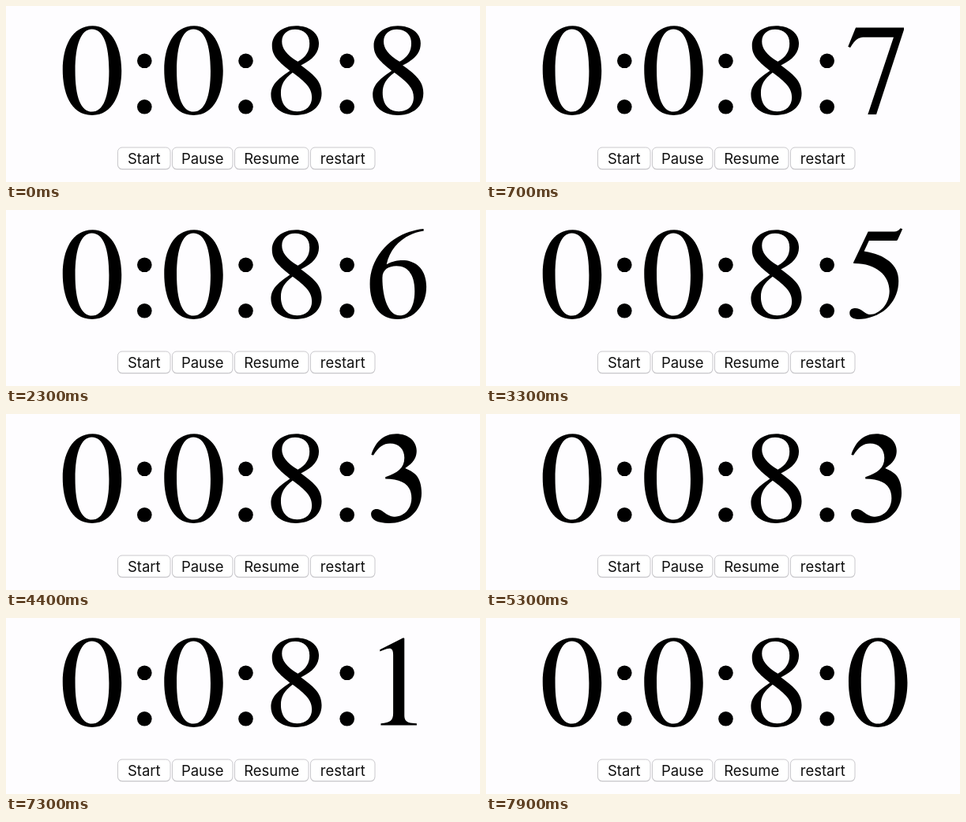
Recreate the animation shown at these times as an HTML page. Size 600 by 224 pixels, loop 8000 ms.

```html
<!DOCTYPE html>
<html lang="en">
<head>
<meta charset="utf-8">
<title>Countdown</title>
<style>
  html, body { margin: 0; width: 100%; height: 100%; overflow: hidden; background: #fefdff; }
  svg { display: block; width: 600px; height: 224px; }
  text { font: 18.5px Inter, Roboto, sans-serif; text-anchor: middle; fill: #111; }
</style>
</head>
<body>
<svg id="stage" viewBox="0 0 600 224" role="img" aria-label="Countdown timer">
  <g id="clock" fill="#000"></g>
  <g id="buttons"></g>
</svg>
<script>
// Digit outlines on a 1000-unit em, y pointing up
const DIGITS = [
  "M476 330C476 158 413 -14 250 -14C79 -14 24 172 24 336C24 513 93 676 254 676C385 676 476 535 476 330ZM380 325C380 533 336 650 248 650C165 650 120 532 120 329C120 126 164 12 250 12C335 12 380 127 380 325Z",
  "M394 0H118V15C192 19 213 40 213 95V544C213 578 204 593 183 593C173 593 156 588 138 581L111 571V585L290 676L299 673V76C299 33 319 15 394 15Z",
  "M474 137L420 0H29V12L207 201C301 300 337 376 337 461C337 552 283 602 198 602C126 602 91 570 51 472L30 477C51 594 115 676 238 676C351 676 423 599 423 500C423 421 384 346 295 252L130 76H364C406 76 427 87 460 143Z",
  "M61 510L45 514C74 609 137 676 237 676C328 676 393 621 393 544C393 492 369 452 305 410C347 392 372 376 388 358C415 327 431 280 431 219C431 154 407 96 367 56C322 10 256 -14 180 -14C94 -14 43 11 43 55C43 78 60 94 86 94C102 94 117 88 148 66C183 41 201 36 228 36C298 36 354 99 354 178C354 280 284 328 153 328V342C245 372 299 410 299 490C299 558 255 601 189 601C139 601 101 575 61 510Z",
  "M472 167H370V0H292V167H12V231L326 676H370V231H472ZM292 231V574L52 231Z",
  "M438 681L402 602C399 595 395 592 384 592H181L143 511C234 495 290 472 335 434C382 394 408 347 408 280C408 196 375 123 315 68C255 14 171 -14 97 -14C57 -14 32 4 32 32C32 58 48 70 76 70C97 70 114 63 138 44C156 29 172 22 187 22C263 22 338 104 338 204C338 324 235 417 72 417C64 417 61 419 61 424L64 430L174 662H375C395 662 407 669 423 688Z",
  "M446 684L448 668C293 643 192 543 162 409C212 434 248 440 285 440C398 440 468 359 468 238C468 166 448 109 409 63C371 14 313 -14 246 -14C180 -14 127 11 90 59C54 107 34 175 34 257C34 482 218 662 446 684ZM378 203C378 328 328 396 238 396C178 396 130 368 130 306C130 150 178 14 264 14C336 14 378 86 378 203Z",
  "M449 646L237 -8H172L370 588H153C98 588 78 575 37 507L20 515L79 662H449Z",
  "M445 155C445 51 366 -14 247 -14C137 -14 56 52 56 142C56 212 94 257 201 329C96 413 64 454 64 524C64 610 143 676 248 676C345 676 424 625 424 541C424 468 381 418 286 371C402 288 445 238 445 155ZM352 541C352 607 309 648 241 648C181 648 140 611 140 555C140 502 172 457 262 399C327 437 352 480 352 541ZM370 124C370 186 335 230 237 304L222 315C157 266 132 222 132 158C132 70 180 14 256 14C324 14 370 57 370 124Z"
];
const LOOP = 8000, TICK = 1000, FIRST_TICK = 400;
const EM = 164.8, BASELINE = 136.6;

function add(parent, tag, attrs, label) {
  const node = document.createElementNS("http://www.w3.org/2000/svg", tag);
  for (const key in attrs) node.setAttribute(key, attrs[key]);
  if (label) node.textContent = label;
  return parent.appendChild(node);
}

const stage = document.getElementById("stage");
const clock = document.getElementById("clock");
const buttons = document.getElementById("buttons");

const scale = EM / 1000;
const digits = [67.8, 196.3, 326.2, 455].map(x =>
  add(clock, "path", { transform: `translate(${x} ${BASELINE}) scale(${scale} ${-scale})` }));

for (const cx of [175.3, 303.5, 431.7])
  for (const cy of [69.8, 128.3]) add(clock, "circle", { cx, cy, r: 9.3 });

function addButton(label, x, width) {
  const box = { x, y: 180, width, height: 27.5, rx: 5.5 };
  add(buttons, "rect", { ...box, y: 180.8, fill: "#b5b4b8" });
  add(buttons, "rect", { ...box, fill: "#fff", stroke: "#c9c8cc", "stroke-width": 1 });
  add(buttons, "text", { x: x + width / 2, y: 201 }, label);
}
addButton("Start", 141.5, 66.5);
addButton("Pause", 210.5, 76.5);
addButton("Resume", 289.5, 93.5);
addButton("restart", 385.5, 81.5);

let shown = "";
function render(time) {
  const ticks = Math.floor((time % LOOP - FIRST_TICK) / TICK) + 1;
  const value = "008" + (8 - ticks);
  if (value === shown) return;
  shown = value;
  digits.forEach((path, i) => path.setAttribute("d", DIGITS[value[i]]));
  stage.setAttribute("aria-label", [...value].join(":"));
}

const start = performance.now();
function frame() {
  render(performance.now() - start);
  requestAnimationFrame(frame);
}
frame();
</script>
</body>
</html>
```
